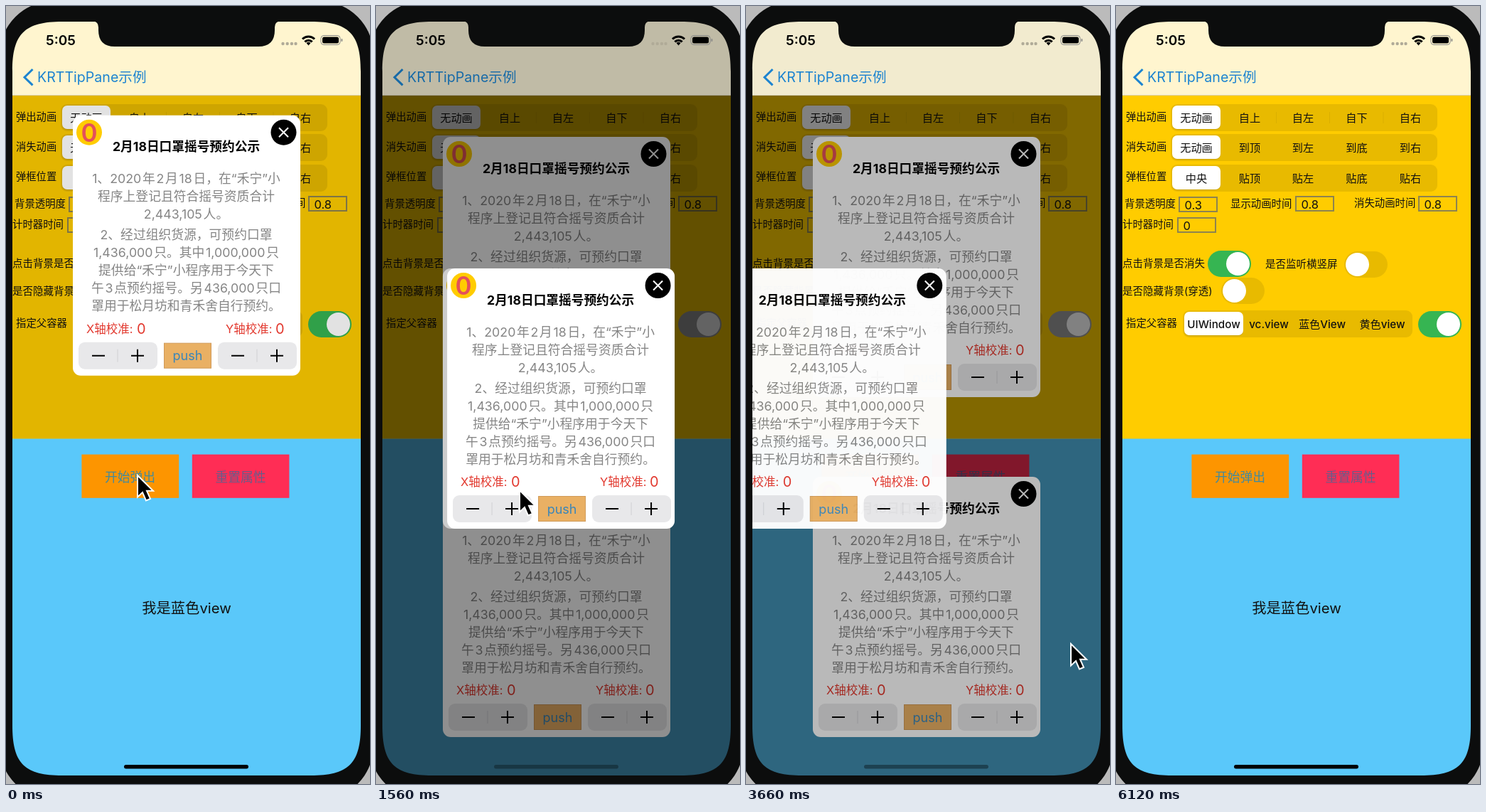
Animation of 512 by 1094 pixels, one loop 6180 ms. Source, as an HTML page:

```html
<!DOCTYPE html>
<html lang="zh-CN">
<head>
<meta charset="utf-8">
<style>
html, body { margin: 0; height: 100%; overflow: hidden; background: #bbb; }
svg { display: block; width: 100vw; height: 100vh; }
text { font-family: Inter, "Noto Sans CJK SC", "Noto Sans CJK", sans-serif; white-space: pre; }
#ghost { filter: blur(4px); }
</style>
</head>
<body>
<svg id="stage" viewBox="0 0 512 1094"></svg>
<script>
const LOOP = 6180, STEP = 60, FADE = 0.8, SHADE = 0.3, RATE = 8.6;
const LINK = '#1d84d0';

// Markup helpers; text is placed by its vertical centre.
const rect = (x, y, w, h, fill, more = '') =>
  `<rect x="${x}" y="${y}" width="${w}" height="${h}" fill="${fill}" ${more}/>`;
const circle = (x, y, r, fill) => `<circle cx="${x}" cy="${y}" r="${r}" fill="${fill}"/>`;
const path = (d, stroke, width, more = '') =>
  `<path d="${d}" fill="none" stroke="${stroke}" stroke-width="${width}" ${more}/>`;
const text = (x, y, size, str, fill = '#111', more = '') =>
  `<text x="${x}" y="${y + size * 0.37}" font-size="${size}" fill="${fill}" ${more}>${str}</text>`;
const mid = (x, y, size, str, fill, more = '') =>
  text(x, y, size, str, fill, `text-anchor="middle" ${more}`);
// Small gaps where digits and Chinese characters meet.
const spaced = s => s.replace(/(?<=[一-龥])\d|(?<=\d)[一-龥]/g, '<tspan dx="1.7">$&</tspan>');

function segments(x, y, w, pillW, names, centres) {
  return rect(x, y, w, 38, '#000', 'rx="9" fill-opacity=".09"') +
    rect(x + 2, y + 3, pillW, 33, '#000', 'rx="7" fill-opacity=".12"') +
    rect(x + 2, y + 2, pillW, 33, '#fff', 'rx="7"') +
    names.map((n, i) => mid(centres[i], y + 19, 15.2, n, '#111', 'font-weight="500"')).join('');
}
function toggle(x, y, on) {
  const track = on ? rect(x, y, 61, 37, 'var(--on)', 'rx="18.5"')
                   : rect(x, y, 61, 37, '#000', 'rx="18.5" fill-opacity=".09"');
  return track + circle(x + (on ? 42.5 : 18.5), y + 18.5, 16.5, '#fff');
}
const field = (x, y, value) =>
  rect(x + 1, y + 1, 53, 20, 'none', 'stroke="#8d8350" stroke-width="2"') +
  text(x + 8.5, y + 12, 16.5, value);

function stepper(x) {
  return rect(x, 319, 111, 38, '#e8e8ea', 'rx="9"') +
    path(`M${x + 55} 329v18`, '#d0d0d3', 1) +
    path(`M${x + 19} 338h18M${x + 74} 338h18M${x + 83} 329v18`, '#000', 2);
}

const body = [
  [89, '1、2020年2月18日，在“禾宁”小'], [114, '程序上登记且符合摇号资质合计'],
  [139, '2,443,105人。'], [168, '2、经过组织货源，可预约口罩'],
  [193, '1,436,000只。其中1,000,000只'], [218, '提供给“禾宁”小程序用于今天下'],
  [243, '午3点预约摇号。另436,000只口'], [268, '罩用于松月坊和青禾舍自行预约。']
];
const RED = '#e2382e';
const card = rect(0, 0, 320, 366, '#fff', 'rx="11"') +
  circle(23, 24, 18, '#ffcc00') + mid(23, 24, 35, '0', '#e4505a', 'font-weight="600"') +
  circle(296.5, 24, 18, '#000') + path('M290 17.5l13 13m0-13l-13 13', '#fff', 2) +
  mid(159.5, 44, 17.7, '2月18日口罩摇号预约公示', '#000', 'font-weight="700"') +
  body.map(([y, s]) => mid(159.5, y, 17.8, spaced(s), '#858585')).join('') +
  text(19, 300, 16.5, 'X轴校准:', RED) + text(90, 300, 20, '0', RED) +
  text(215, 300, 16.5, 'Y轴校准:', RED) + text(285, 300, 20, '0', RED) +
  stepper(8) + stepper(204) +
  rect(128.5, 320.5, 66, 35, '#e9b064', 'stroke="#d09a58"') + mid(161.5, 338, 18, 'push', '#3b86b8');

const cols = [113, 188, 263, 338.5, 414];
const settings =
  text(14, 156, 14.3, '弹出动画') + segments(77, 138, 375, 68, ['无动画', '自上', '自左', '自下', '自右'], cols) +
  text(14, 198, 14.3, '消失动画') + segments(77, 180, 375, 68, ['无动画', '到顶', '到左', '到底', '到右'], cols) +
  text(14, 240, 14.3, '弹框位置') + segments(77, 223, 375, 68, ['中央', '贴顶', '贴左', '贴底', '贴右'], cols) +
  path('M225.5 149v16M300.5 149v16M376 149v16', 'rgba(0,0,0,.06)', 1) +
  text(12, 278, 14.4, '背景透明度') + field(88, 268, '0.3') +
  text(161, 278, 14.4, '显示动画时间') + field(252, 267, '0.8') +
  text(335, 277, 14.4, '消失动画时间') + field(425, 267, '0.8') +
  text(9, 307, 14.4, '计时器时间') + field(86, 297, '0') +
  text(9, 362, 14.5, '点击背景是否消失') + toggle(129, 344, true) +
  text(210, 363, 14.5, '是否监听横竖屏') + toggle(321, 345, false) +
  text(9, 401, 14.5, '是否隐藏背景(穿透)') + toggle(148, 382, false) +
  text(14, 446, 14.4, '指定父容器') +
  segments(94, 428, 323, 83, ['UIWindow', 'vc.view', '蓝色View', '黄色view'], [137.5, 215, 290, 374.5]) +
  toggle(425, 429, true);

const blueView = rect(9, 608.5, 490, 474, '#5ac8fa') +
  rect(106.4, 630.6, 136.8, 61.2, '#fd9500') + mid(174.5, 662, 17.8, '开始弹出', '#3f8aa0') +
  rect(261.8, 630.6, 136.6, 61.2, '#ff2d55') + mid(330, 662, 17.8, '重置属性', '#665c8a') +
  mid(254, 846, 20.3, '我是蓝色view');

// The bar blurs whatever slides beneath it, so a soft ghost stands in for the card there.
const nav = rect(9, 22, 490, 104, '#fff', 'fill-opacity=".81"') +
  '<g clip-path="url(#bar)">' + rect(98, 0, 312, 362, '#f1f1f3', 'id="ghost"') + '</g>' +
  rect(9, 125, 490, 1, '#000', 'fill-opacity=".15"') +
  path('M37.5 89L26 100.2l11.5 11.2', LINK, 3) + text(44, 100, 19.6, 'KRTTipPane示例', LINK);

const status = text(56, 48, 19, '5:05', '#000', 'font-weight="600"') +
  [389.5, 395.7, 401.9, 407.5].map(x => circle(x, 53, 2.2, '#b0ab98')).join('') +
  path('M417 46.5a12.3 12.3 0 0 1 17 0M420.3 50.3a7.5 7.5 0 0 1 10.4 0', '#000', 3) +
  '<path d="M425.5 55.5l-3-3.4a4.5 4.5 0 0 1 6 0z"/>' +
  rect(443, 41.5, 27, 13, 'none', 'rx="4" stroke="#888"') + rect(445, 43.5, 23, 9, '#000', 'rx="2.5"') +
  rect(471.5, 46, 1.8, 4, '#888', 'rx="1"');

const bezel = `<path fill="#0c0d0d" fill-rule="evenodd" d="M67 -7H441a76 76 0 0 1 76 76V1040a76 76 0 0 1-76 76H67
  a76 76 0 0 1-76-76V69a76 76 0 0 1 76-76z
  M79 22C26 22 9 39 9 92V1012C9 1065 26 1082 79 1082H429C482 1082 499 1065 499 1012V92C499 39 482 22 429 22z"/>
  <path fill="#0c0d0d" d="M122 21q8 1 8 9v4q0 23 23 23h202q23 0 23-23v-4q0-8 8-9z"/>`;

// Each pop-up: shaded area, resting place, hidden offset, start and dismissal in seconds.
const pops = [
  { top: 126, h: 482.5, y: 184, dx: 0, dy: -550, start: -0.337, end: 4.915 },
  { top: 608.5, h: 474, y: 662, dx: 0, dy: 420, start: 0.125, end: 4.22 },
  { top: 22, h: 1060, y: 369, dx: -414, dy: 0, start: 0.588, end: 3.52 },
  { top: 22, h: 1060, y: 369, dx: 418, dy: 0, start: 1.068, end: 2.81 }
];
const layer = i => rect(9, pops[i].top, 490, pops[i].h, '#000', `id="shade${i}"`) +
  `<g id="card${i}">${card}</g>`;

const stage = document.getElementById('stage');
stage.innerHTML = '<clipPath id="screen">' + rect(9, 22, 490, 1060, '#000') + '</clipPath>' +
  '<clipPath id="bar">' + rect(9, 22, 490, 104, '#000') + '</clipPath>' +
  '<g clip-path="url(#screen)">' + rect(9, 22, 490, 587, '#ffcc00') + settings +
  layer(0) + blueView + layer(1) + layer(2) + nav +
  rect(166, 1067, 175, 5.5, '#000', 'rx="2.75" id="home"') + layer(3) + status + '</g>' + bezel +
  '<path id="cursor" d="M0 0V30.5l7-6.5 5 11.5 6-2.6-5-11.2h9z" stroke="#fff" stroke-width="2"/>';

const byId = id => document.getElementById(id);
const smooth = v => { v = Math.min(1, Math.max(0, v)); return v * v * (3 - 2 * v); };

// Pointer stops: time, x, y.
const stops = [[0, 185, 660], [0.3, 185, 660], [0.8, 202, 681], [1.9, 202, 681], [2.7, 430, 890],
  [3.2, 430, 890], [3.6, 457, 897], [4.5, 457, 897], [5.1, 277, 866], [9, 277, 866]];

function drawPop(p, i, t) {
  const age = t - p.start, out = Math.max(0, (t - p.end) / FADE);
  const shown = age >= 0 && out < 1;
  const away = out > 0 ? 1 - (1 - out) ** 2 : Math.exp(-RATE * age);
  const shade = shown ? SHADE * Math.min(smooth(age / FADE), 1 - smooth(out)) : 0;
  const alpha = shown ? 1 - out ** 2 : 0;
  const y = p.y + p.dy * away;
  byId('shade' + i).setAttribute('opacity', shade);
  const el = byId('card' + i);
  el.setAttribute('opacity', alpha);
  el.setAttribute('transform', `translate(${94 + p.dx * away} ${y})`);
  return { shade, alpha, y };
}

function draw(t) {
  const [inner, , page] = pops.map((p, i) => drawPop(p, i, t));
  byId('ghost').setAttribute('y', inner.y);
  byId('ghost').setAttribute('opacity', inner.alpha);
  stage.style.setProperty('--on', page.shade > 0.1 ? '#9c9c9c' : '#36b552');
  byId('home').setAttribute('opacity', 1 - page.shade * 2.3);

  const n = stops.findIndex(s => s[0] > t);
  const [t0, x0, y0] = stops[n - 1], [t1, x1, y1] = stops[n];
  const k = smooth((t - t0) / (t1 - t0));
  const cursor = byId('cursor');
  cursor.setAttribute('transform', `translate(${x0 + (x1 - x0) * k} ${y0 + (y1 - y0) * k})`);
  cursor.setAttribute('visibility', t < 5.9 ? 'visible' : 'hidden');
}

const begin = performance.now();
function tick() {
  const t = (performance.now() - begin) % LOOP;
  draw(Math.floor(t / STEP) * STEP / 1000);
  requestAnimationFrame(tick);
}
tick();
</script>
</body>
</html>
```
